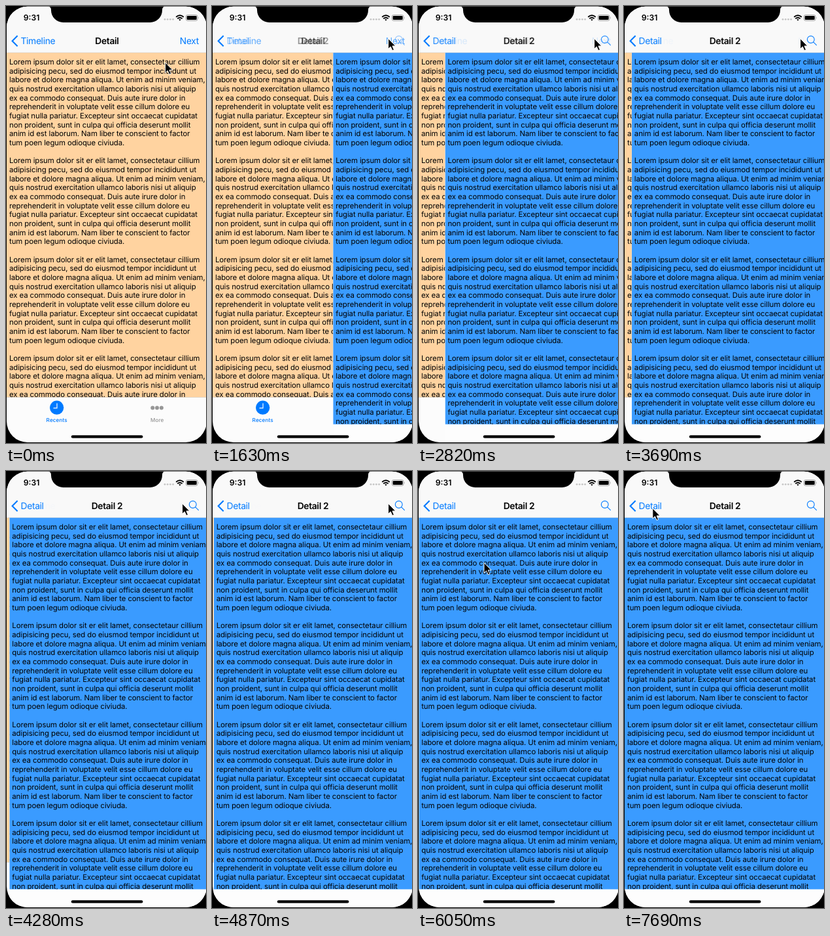
These frames come from a looping animation (306x665 px, 7990 ms). An HTML page:

```html
<!DOCTYPE html>
<html lang="en">
<head>
<meta charset="utf-8">
<title>Push transition</title>
<style>
  html, body { margin: 0; width: 100%; height: 100%; overflow: hidden; background: #000; }
  svg { display: block; width: 306px; height: 665px; }
  text { font-family: Inter, "Open Sans", sans-serif; text-rendering: geometricPrecision; }
  .body { font-size: 11.42px; letter-spacing: -.1px; }
  .nav { font-size: 13.87px; letter-spacing: -.35px; }
  .tab { font-size: 8.16px; font-weight: 500; letter-spacing: .1px; }
  .bold { font-weight: 600; }
  .mid { text-anchor: middle; }
  .blue { fill: #007aff; }
  .line { fill: none; stroke: #007aff; }
</style>
</head>
<body>
<svg viewBox="0 0 306 665">
  <defs>
    <clipPath id="screen"><rect x="1" y=".7" width="306" height="663.3" rx="32"/></clipPath>
    <clipPath id="upper"><rect y="71" width="307" height="524.5"/></clipPath>
    <clipPath id="lower"><rect y="71" width="307" height="565.5"/></clipPath>
    <g id="copy" class="body"></g>
  </defs>
  <g clip-path="url(#screen)">
    <rect width="307" height="665" fill="#fcfcfc"/>

    <g clip-path="url(#upper)">
      <rect y="71" width="307" height="525" fill="#ffd3a0"/>
      <use href="#copy" x="5"/>
    </g>
    <path d="M0 595.5h307" stroke="#c4c4c4" stroke-width=".5"/>
    <circle cx="77.7" cy="611.2" r="10.6" class="blue"/>
    <path d="M78 604.5v7.3h-5.5" fill="none" stroke="#fff" stroke-width="1.2"/>
    <text x="77.7" y="633.3" class="tab mid blue">Recents</text>
    <g fill="#979797">
      <circle cx="224.3" cy="611.5" r="3"/><circle cx="231.1" cy="611.5" r="3"/><circle cx="237.9" cy="611.5" r="3"/>
      <text x="231.2" y="633.3" class="tab mid">More</text>
    </g>

    <g id="pushed">
      <rect y="71" width="307" height="594" fill="#fdfdfd"/>
      <g clip-path="url(#lower)">
        <rect y="71" width="307" height="566" fill="#3a9bff"/>
        <use href="#copy" x="4"/>
      </g>
    </g>

    <rect width="307" height="71" fill="#f9f9f9"/>
    <path d="M0 71h307" stroke="#c4c4c4" stroke-width=".5"/>
    <path d="M17.6 45.2l-8 8 8 8" class="line" stroke-width="2.1"/>
    <g id="oldBar" class="nav">
      <text x="22.5" y="58" class="blue">Timeline</text>
      <text x="154.5" y="58" class="bold mid">Detail</text>
      <text x="295" y="58" class="blue" text-anchor="end">Next</text>
    </g>
    <g id="newBar" class="nav">
      <text x="22.5" y="58" class="blue">Detail</text>
      <text x="154.5" y="58" class="bold mid">Detail 2</text>
      <path d="M289.7 54.8l5.1 5M291.2 51a5.4 5.4 0 1 0-10.8 0a5.4 5.4 0 1 0 10.8 0" class="line" stroke-width="1.1"/>
    </g>

    <text x="39" y="22.3" class="bold mid" font-size="12.2">9:31</text>
    <g fill="#c6c6c6">
      <circle cx="243" cy="20.3" r="1.4"/><circle cx="247.2" cy="20.3" r="1.4"/>
      <circle cx="251.4" cy="20.3" r="1.4"/><circle cx="255.6" cy="20.3" r="1.4"/>
    </g>
    <g fill="none" stroke="#000" stroke-width="1.8">
      <path d="M260.2 16.8q5.8-5 11.6 0M262.3 19.3q3.7-3.2 7.4 0"/>
      <path d="M264.3 20.7l1.7 1.9 1.7-1.9q-1.7-1.2-3.4 0z" fill="#000" stroke="none"/>
    </g>
    <rect x="275.4" y="13.6" width="17.6" height="8.8" rx="2.4" fill="none" stroke="#8c8c8c" stroke-width=".8"/>
    <rect x="276.7" y="14.9" width="15" height="6.2" rx="1.3"/>
    <path d="M294 16.5q1.3 1.5 0 3z" fill="#8c8c8c"/>
    <path d="M63 0q6 0 6 6.5a18.5 18.5 0 0 0 18.5 18.5h133A18.5 18.5 0 0 0 239 6.5q0-6.5 6-6.5z"/>
    <rect x="99.8" y="653.3" width="109.6" height="4.2" rx="2.1"/>
  </g>
  <path id="cursor" d="M0 0v15.8l3.6-3.4 2.6 5.8 2.6-1.1-2.5-5.7h4.9z" stroke="#fff" stroke-width="1"/>
</svg>
<script>
const LOOP = 7990, STEPS = 54;
const LINE = 13.665, FIRST_BASELINE = 89;
const paragraph = `Lorem ipsum dolor sit er elit lamet, consectetaur cillium
adipisicing pecu, sed do eiusmod tempor incididunt ut
labore et dolore magna aliqua. Ut enim ad minim veniam,
quis nostrud exercitation ullamco laboris nisi ut aliquip
ex ea commodo consequat. Duis aute irure dolor in
reprehenderit in voluptate velit esse cillum dolore eu
fugiat nulla pariatur. Excepteur sint occaecat cupidatat
non proident, sunt in culpa qui officia deserunt mollit
anim id est laborum. Nam liber te conscient to factor
tum poen legum odioque civiuda.
`.split('\n');

// Pointer stops: step, x, y
const stops = [
  [0, 243.7, 86], [3, 269.7, 49.5], [37, 269.7, 49.5], [41, 101, 139.5],
  [46, 101, 139.5], [49, 47.7, 61.7], [50, 47.7, 61.7], [52, 43.8, 56.7], [STEPS, 43.8, 56.7]
];

const $ = id => document.getElementById(id);
const [copy, pushed, oldBar, newBar, cursor] = ['copy', 'pushed', 'oldBar', 'newBar', 'cursor'].map($);

for (let i = 0; i < 42; i++) {
  const line = document.createElementNS('http://www.w3.org/2000/svg', 'text');
  line.setAttribute('y', FIRST_BASELINE + i * LINE);
  line.textContent = paragraph[i % paragraph.length];
  copy.append(line);
}

const moveTo = (el, x, y) => el.setAttribute('transform', `translate(${x} ${y})`);

function pointerAt(step) {
  const next = Math.max(1, stops.findIndex(s => s[0] >= step));
  const [s0, x0, y0] = stops[next - 1], [s1, x1, y1] = stops[next];
  const k = (step - s0) / (s1 - s0), e = k * k * (3 - 2 * k);
  return [x0 + (x1 - x0) * e, y0 + (y1 - y0) * e];
}

function draw(now) {
  // The picture advances in even steps, about seven a second
  const step = Math.min(STEPS - 1, Math.floor((now % LOOP + 18) * STEPS / LOOP));
  const seconds = step * LOOP / STEPS / 1000;

  // Critically damped spring
  const u = Math.max(0, 1.83 * (seconds - 0.882));
  const rest = (1 + u) * Math.exp(-u);
  moveTo(pushed, 1 + 305 * rest, 0);

  oldBar.style.opacity = rest;
  newBar.style.opacity = 1 - rest;
  moveTo(cursor, ...pointerAt(step));
}

const start = performance.now();
(function tick() {
  draw(performance.now() - start);
  requestAnimationFrame(tick);
})();
</script>
</body>
</html>
```
